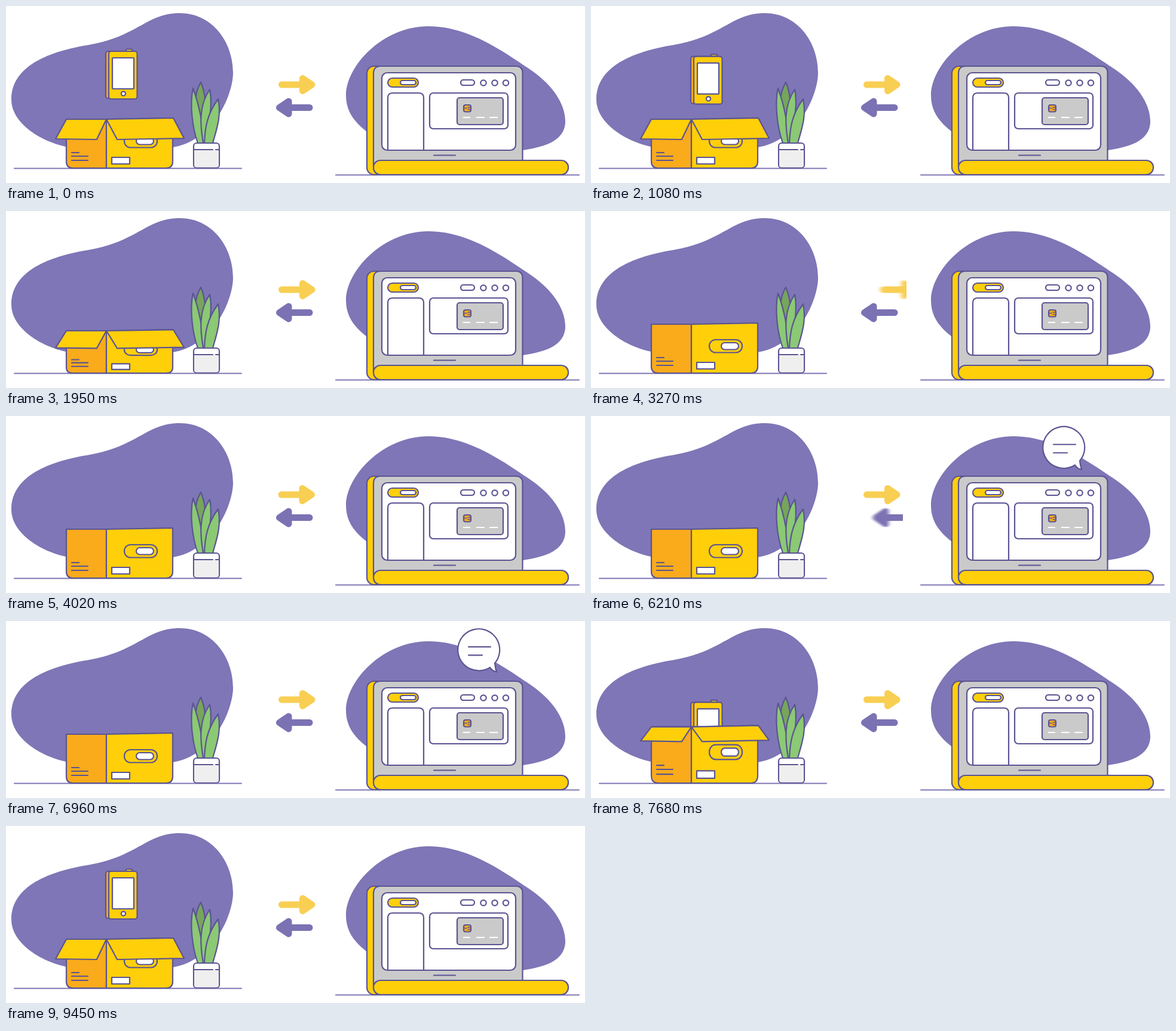
An HTML page for the animation above (9.48 s loop, 969 by 297 pixels).

```html
<!DOCTYPE html>
<html lang="en">
<head>
<meta charset="utf-8">
<title>Parcel and laptop</title>
<style>
  html, body { margin: 0; width: 100%; height: 100%; overflow: hidden; background: #fff; }
  svg { display: block; width: 969px; height: 297px; }
  .line { stroke: #5b5492; stroke-width: 2.2; stroke-linejoin: round; stroke-linecap: round; }
  #box * { vector-effect: non-scaling-stroke; }
  .blob { fill: #7e76b6; }
  .yellow { fill: #ffcf0a; }
  .orange { fill: #f9ab1b; }
  .white { fill: #fff; }
  .grey { fill: #cacaca; }
  .leaf { fill: #8bc974; }
  .none { fill: none; }
  .arrow { stroke-width: 11; stroke-linecap: round; stroke-linejoin: round; }
</style>
</head>
<body>
<svg viewBox="0 0 969 297">
  <defs>
    <clipPath id="aboveFloor"><path d="M0 0H969V262H0Z"/></clipPath>
    <clipPath id="rightSlot"><path d="M447 110H528V152H447Z"/></clipPath>
    <clipPath id="leftSlot"><path d="M436 150H522V192H436Z"/></clipPath>
    <filter id="rightBlur" filterUnits="userSpaceOnUse" x="300" y="100" width="380" height="110"><feGaussianBlur stdDeviation="0 0"/></filter>
    <filter id="leftBlur" filterUnits="userSpaceOnUse" x="300" y="100" width="380" height="110"><feGaussianBlur stdDeviation="0 0"/></filter>
  </defs>

  <path class="blob" d="M9 157C9 95 85 74 140 65C222 50 235 12 291 12C345 12 380 60 380 112C380 150 345 233 270 238C230 237 150 240 110 238C60 230 9 197 9 157Z"/>
  <path class="blob" d="M569 150C569 101 630 34 707 34C773 34 830 75 872 103C915 131 937 165 936 196C934 225 905 236 865 242L640 235C600 210 569 190 569 150Z"/>
  <path d="M14 272.5H394M552 283.5H959" stroke="#7e76b6" stroke-width="2.2" stroke-linecap="round"/>

  <g class="line">
    <path fill="#77a55c" d="M326 128C312 152 318 172 323 186L330 186C336 165 334 147 326 128Z"/>
    <path class="leaf" d="M313 138C307 165 312 205 321 230H331C330 200 323 165 313 138Z"/>
    <path class="leaf" d="M341 140C322 168 325 200 330 230H338C337 195 347 170 341 140Z"/>
    <path class="leaf" d="M355 156C336 182 333 205 332 230H346C352 208 361 185 355 156Z"/>
    <rect class="white" x="314" y="230" width="43" height="41.5" rx="5"/>
    <path fill="#efefef" stroke="none" d="M315 242H356V267Q356 270.5 352 270.5H319Q315 270.5 315 267Z"/>
    <path d="M315 241H346M351 241H356"/>
  </g>

  <g clip-path="url(#aboveFloor)">
    <g id="phone" class="line">
      <rect class="yellow" x="201" y="72.5" width="10" height="6" rx="1"/>
      <rect class="orange" x="167" y="76" width="46" height="79" rx="4"/>
      <rect class="yellow" x="172" y="76" width="47.5" height="80" rx="4"/>
      <rect class="white" x="178" y="87" width="36" height="52" rx="1"/>
      <circle class="white" cx="196.5" cy="147" r="3.6"/>
    </g>
  </g>

  <g id="box" class="line">
    <path class="orange" d="M101 190H168V272H112Q101 272 101 261Z"/>
    <path class="yellow" d="M168 190L279 188V261Q279 272 268 272H168Z"/>
    <path d="M110 246H122M110 252H137M110 259H137"/>
    <rect class="white" x="177" y="254" width="30" height="11"/>
    <rect class="yellow" x="198" y="216" width="55" height="21.5" rx="10.5"/>
    <rect class="white" x="218" y="221" width="29" height="11.5" rx="5.7"/>
    <path id="flapLeft" class="yellow"/>
    <path id="flapRight" class="yellow"/>
  </g>

  <g clip-path="url(#rightSlot)"><g filter="url(#rightBlur)">
    <g id="rightArrow" class="arrow" fill="#f8cf53" stroke="#f8cf53">
      <path d="M461.5 132H495M496.5 121.5L512 132L496.5 142.5Z"/>
    </g>
  </g></g>
  <g clip-path="url(#leftSlot)"><g filter="url(#leftBlur)">
    <g id="leftArrow" class="arrow" fill="#7b72b4" stroke="#7b72b4">
      <path d="M508 170.5H475M473 160L457.5 170.5L473 181Z"/>
    </g>
  </g></g>

  <g class="line">
    <rect class="yellow" x="604" y="101" width="40" height="182" rx="12"/>
    <path class="grey" d="M615 270V113Q615 101 627 101H853Q864.5 101 864.5 112V270Z"/>
    <rect class="yellow" x="615" y="259" width="326" height="24" rx="11.5"/>
    <rect class="white" x="629" y="112" width="224" height="130" rx="9"/>
    <rect class="yellow" x="639" y="121" width="51" height="15" rx="7.5"/>
    <rect class="white" x="660" y="125" width="26" height="7" rx="3.5"/>
    <rect class="white" x="761" y="124" width="23" height="9" rx="4.5"/>
    <circle class="white" cx="799" cy="129" r="4.7"/>
    <circle class="white" cx="818" cy="129" r="4.7"/>
    <circle class="white" cx="836.5" cy="129" r="4.7"/>
    <path class="none" d="M639 242V154Q639 146 647 146H691Q699 146 699 154V242"/>
    <rect class="white" x="709" y="146" width="131" height="60" rx="6"/>
    <rect class="grey" x="755" y="154" width="77" height="45" rx="4"/>
    <rect class="orange" x="766" y="166" width="12" height="11.5" rx="3"/>
    <path class="none" stroke-width="1.5" d="M767 171.5H771M773 170H777M773 173.5H777"/>
    <path d="M716 250.5H752"/>
  </g>
  <path d="M765 187H777M787 187H801M809 187H823" stroke="#fff" stroke-width="2"/>

  <g id="sparks" stroke-linecap="round"></g>
  <g id="bubble" class="line">
    <path class="white" d="M810 77.5A35 35 0 1 1 818 70.5Q819 79 821 85Q814 84 810 77.5Z"/>
    <path d="M774 43H811M774 57H797"/>
  </g>
</svg>
<script>
const LOOP = 9480, BOB = 1920, SWEEP = 440, TRAVEL = 175;
const $ = id => document.getElementById(id);
const clamp = v => Math.min(1, Math.max(0, v));
const progress = (t, start, length) => clamp((t - start) / length);
const smooth = p => (1 - Math.cos(Math.PI * p)) / 2;
const wave = (t, height) => height / 2 * (1 - Math.cos(2 * Math.PI * t / BOB));
const mix = (a, b, p) => a + (b - a) * p;

// Eased value along [time, value] keys.
function track(t, keys) {
  let value = keys[0][1];
  for (let i = 1; i < keys.length; i++) {
    const [start, from] = keys[i - 1], [end, to] = keys[i];
    if (t >= start) value = mix(from, to, smooth(progress(t, start, end - start)));
  }
  return value;
}

const squash = [[1870, 1], [1950, .866], [2120, 1.05], [2300, 1], [7420, 1],
  [7540, .9], [7680, 1.15], [7880, .95], [8050, 1]];
const opening = [[2100, 1], [2480, 0], [7570, 0], [7760, 1]];
const popping = [[4400, 0], [4620, 1.12], [4760, .96], [4880, 1], [7290, 1], [7370, 1.06], [7540, 0]];

function phoneShift(t) {
  const hover = wave(t - LOOP, 9);
  if (t < 4000) return mix(wave(t, 9), 138, progress(t, 1560, 330) ** 2);
  return mix(hover, 138, (1 - progress(t, 7560, 500)) ** 3);
}

function drawBox(t) {
  const open = track(t, opening), drop = 34 * open, spread = 18 * clamp(open * 1.6);
  $('box').setAttribute('transform', `translate(0 272) scale(1 ${track(t, squash)}) translate(0 -272)`);
  $('flapLeft').setAttribute('d', `M101 190H168L${168 - spread * .9} ${190 + drop}L${101 - spread} ${189 + drop}Z`);
  $('flapRight').setAttribute('d', `M168 190L280 188L${280 + spread} ${188 + drop}L${168 + spread} ${190 + drop}Z`);
  for (const id of ['flapLeft', 'flapRight']) $(id).style.display = open > .01 ? '' : 'none';
}

// Three passes: leave the slot on one side, return from the other.
function drawArrow(name, t, start, direction) {
  const local = t - start, moving = local > 0 && local < 3 * SWEEP;
  const phase = moving ? local % SWEEP / SWEEP : 0;
  const path = TRAVEL * smooth(phase);
  const shift = path > TRAVEL / 2 ? path - TRAVEL : path;
  const blur = 5 * Math.sin(Math.PI * phase);
  $(name + 'Arrow').setAttribute('transform', `translate(${direction * shift} 0)`);
  $(name + 'Blur').firstElementChild.setAttribute('stdDeviation', `${blur} 0`);
}

function drawBubble(t) {
  const size = track(t, popping), y = wave(t - 5200, 4.8);
  $('bubble').style.display = size > .01 ? '' : 'none';
  $('bubble').setAttribute('transform', `translate(820 ${85 + y}) scale(${size}) translate(-820 -85)`);
}

const sparks = [-30, -3, 24].map((angle, i) => {
  const spark = document.createElementNS('http://www.w3.org/2000/svg', 'path');
  spark.setAttribute('stroke', i === 1 ? '#f8cf53' : '#5b5492');
  spark.setAttribute('transform', `translate(791 48) rotate(${angle})`);
  return $('sparks').appendChild(spark);
});

function drawSparks(t) {
  const p = progress(t, 4640, 430), outer = 44 + 20 * smooth(clamp(p * 1.5));
  const inner = mix(44, outer, smooth(p));
  $('sparks').style.display = p > 0 && p < 1 ? '' : 'none';
  $('sparks').setAttribute('stroke-width', 2.4 * (1 - p) + .6);
  sparks.forEach(spark => spark.setAttribute('d', `M${inner} 0H${outer}`));
}

function draw(now) {
  const t = now % LOOP;
  $('phone').setAttribute('transform', `translate(0 ${phoneShift(t)})`);
  $('phone').style.display = t > 1900 && t < 7560 ? 'none' : '';
  drawBox(t);
  drawArrow('right', t, 2716, 1);
  drawArrow('left', t, 5427, -1);
  drawBubble(t);
  drawSparks(t);
  requestAnimationFrame(() => draw(performance.now() - origin));
}
const origin = performance.now();
draw(0);
</script>
</body>
</html>
```
